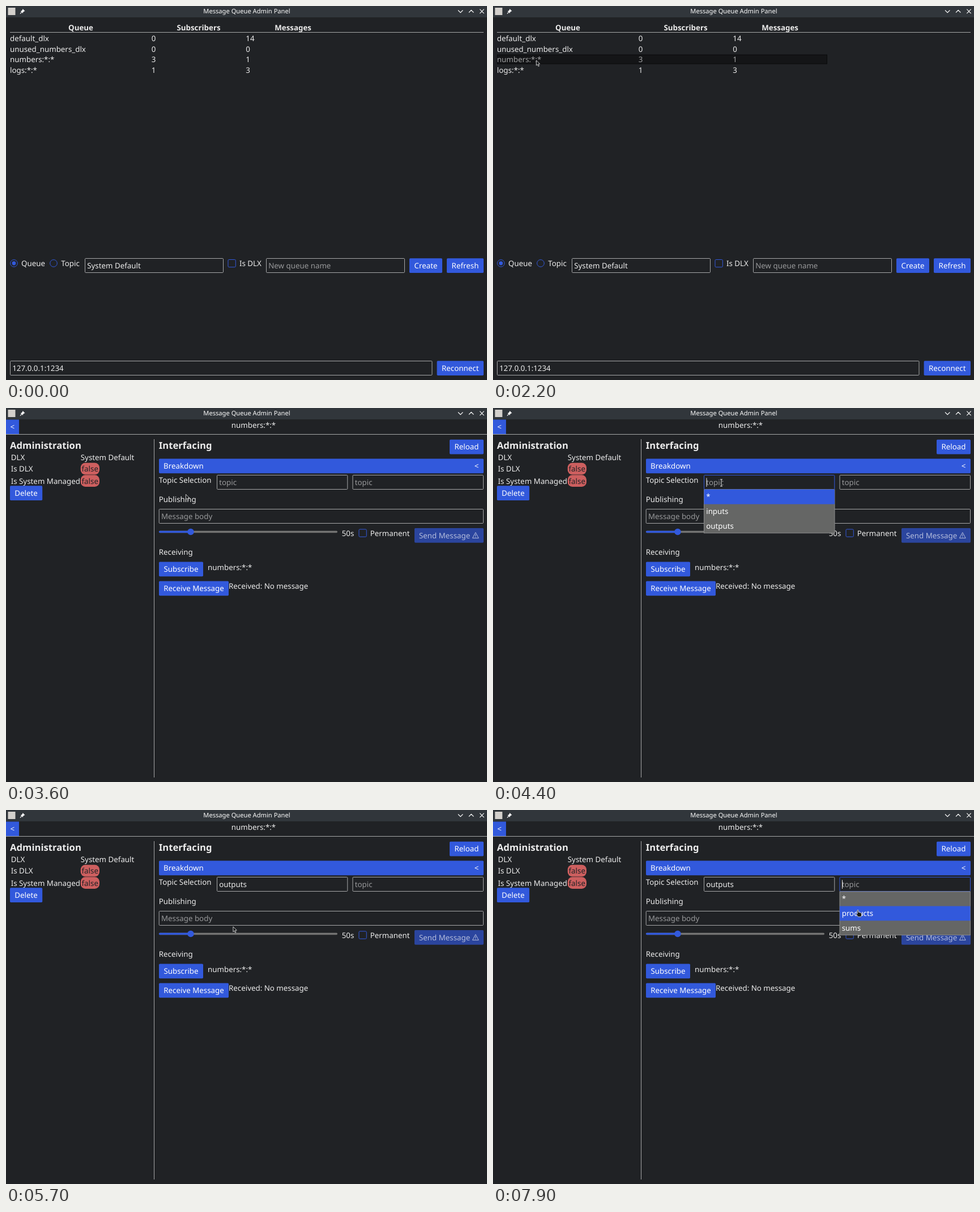
These frames come from a looping animation (849x660 px, 8 s). An HTML page:

```html
<!DOCTYPE html>
<html lang="en">
<head>
<meta charset="utf-8">
<title>Message Queue Admin Panel</title>
<style>
  html, body { margin: 0; width: 100%; height: 100%; overflow: hidden; background: #202225; }
  svg { display: block; width: 100vw; height: 100vh; }
  text {
    font: 13.333px "Noto Sans", "Open Sans", sans-serif;
    fill: #ececec; white-space: pre; text-rendering: geometricPrecision;
  }
  .bold { font-weight: 700; }
  .head { font-size: 16.667px; font-weight: 700; }
  .title { font-size: 11.15px; fill: #fcfcfc; }
  .mid { text-anchor: middle; }
  .hint { fill: #97989a; }
  .dark { fill: #202225; }
  .btn { fill: #3259dc; }
  .on-btn { fill: #fff; }
  .off { fill: #2b459e; }
  .on-off { fill: #b3bcdc; }
  .line { stroke: #a6a7a8; fill: none; }
  .box { fill: none; stroke: #a6a7a8; }
  .box.hover { stroke: #e6e6e6; }
  .box.focus { stroke: #3259dc; }
  .tick { fill: none; stroke: #3259dc; }
  .pill { fill: #cd5f5f; }
  .row rect { fill: none; }
  .row.hover rect { fill: #141517; stroke: #08090a; }
  .row.hover text { fill: #a0a1a2; }
  .icon { fill: none; stroke: #fcfcfc; stroke-width: 1.1; }
  .shape { fill: #17191b; stroke: #eee; stroke-width: .8; stroke-linejoin: round; }
</style>
</head>
<body>
<svg viewBox="0 0 849 660" preserveAspectRatio="none">
  <rect width="849" height="660" fill="#202225"/>
  <g id="list"></g>
  <g id="admin"></g>
  <g id="menu"></g>
  <g id="bar">
    <rect width="849" height="20" fill="#31363b"/>
    <rect x="3.5" y="3" width="13" height="13" fill="#d3d0cc"/>
    <path d="M29.5 5 33.5 9 31.8 9.4 29.9 11.3 29.6 13 25.6 9 27.3 8.7 29.1 6.8Z" fill="#fcfcfc"/>
    <path d="M27.6 11 25 13.6" class="icon"/>
    <path d="M798 7.5l4.2 4.2 4.2-4.2M817 11.5l4.2-4.2 4.2 4.2M836.3 5.7l7.4 7.4M843.7 5.7l-7.4 7.4" class="icon"/>
    <text x="425" y="13.4" class="title mid">Message Queue Admin Panel</text>
  </g>
  <g id="cursor">
    <path id="arrow" class="shape" d="M.4.4V9.4L2.5 7.5 4 11 5.5 10.3 4 6.9 6.8 6.7Z"/>
    <g id="beam" fill="none">
      <path d="M-2-6H2M0-6V6M-2 6H2" stroke="#17191b" stroke-width="2.4"/>
      <path d="M-2-6H2M0-6V6M-2 6H2" stroke="#eee" stroke-width="1"/>
    </g>
    <path id="hand" class="shape" d="M-1 1Q0-.6 1 1V4.5Q3 3.8 3.4 5 5 4.6 5.2 5.8 6.6 5.6 6.6 7V9Q6.4 11 5.4 12.4H.4Q-1.4 10-3 8-3.4 6.4-1 7.4Z"/>
  </g>
</svg>
<script>
const $ = id => document.getElementById(id);
const text = (x, y, str, cls = '') => `<text x="${x}" y="${y}" class="${cls}">${str}</text>`;
const rect = (x, y, w, h, cls, r = 0, id = '') =>
  `<rect x="${x}" y="${y}" width="${w}" height="${h}" rx="${r}" class="${cls}" id="${id}"/>`;
const line = d => `<path d="${d}" class="line"/>`;
const button = (x, y, w, label) =>
  rect(x, y, w, 25.7, 'btn', 1.7) + text(x + w / 2, y + 17.7, label, 'mid on-btn');
const field = (id, x, y, w, label, cls = 'hint') =>
  rect(x + .5, y + .5, w - 1, 25, 'box', 1.2, id) +
  `<text x="${x + 4.2}" y="${y + 17.7}" class="${cls}" id="${id}Text">${label}</text>`;
const radio = (x, y, on) => `<circle cx="${x}" cy="${y}" r="6.3" class="tick"/>` +
  (on ? `<circle cx="${x}" cy="${y}" r="3.4" class="btn"/>` : '');

const rows = [
  ['default_dlx', 0, 14],
  ['unused_numbers_dlx', 0, 0],
  ['numbers:*:*', 3, 1],
  ['logs:*:*', 1, 3]
];
const rowTop = i => 48.3 + 18.85 * i;

$('list').innerHTML =
  text(132, 42.8, 'Queue', 'bold mid') + text(340, 42.8, 'Subscribers', 'bold mid') +
  text(506.6, 42.8, 'Messages', 'bold mid') + line('M7 46.5H843') +
  rows.map(([name, subs, count], i) => {
    const y = rowTop(i), base = y + 13.4;
    return `<g class="row">${rect(7.5, y + .2, 582, 15.8, '')}` +
      text(7, base, name) + text(256.8, base, subs) + text(423.3, base, count) + '</g>';
  }).join('') +
  radio(14, 454, true) + text(27, 459, 'Queue') +
  radio(84, 454, false) + text(97.3, 459, 'Topic') +
  field('dlx', 139, 445, 245, 'System Default', '') +
  rect(392, 447.5, 13.3, 13.3, 'tick', 1.7) + text(412, 459, 'Is DLX') +
  field('name', 459, 445, 245, 'New queue name') +
  button(712, 445.3, 58, 'Create') + button(778, 445.3, 65, 'Refresh') +
  field('host', 7, 626, 745.5, '127.0.0.1:1234', '') + button(760.6, 626.2, 82.4, 'Reconnect');

$('admin').innerHTML =
  rect(0, 20.5, 23, 25.7, 'btn') + text(11.2, 38.2, '&lt;', 'mid on-btn') +
  text(437, 34.6, 'numbers:*:*', 'mid') + line('M0 46.5H849M261.5 55V652') +
  text(7, 72, 'Administration', 'head') +
  text(8.7, 92.2, 'DLX') + text(131.8, 92.2, 'System Default') +
  text(8.7, 112.2, 'Is DLX') + text(8.7, 133.7, 'Is System Managed') +
  rect(131.7, 96.8, 33.3, 20.8, 'pill', 8.3) + text(133.5, 112.2, 'false', 'dark') +
  rect(131.7, 118.2, 33.3, 20.8, 'pill', 8.3) + text(133.5, 133.7, 'false', 'dark') +
  button(7, 137.3, 57.2, 'Delete') +
  text(269.8, 72, 'Interfacing', 'head') + button(783, 55.7, 60, 'Reload') +
  rect(270, 89.5, 573, 25.7, 'btn', 1.7) + text(278, 107.2, 'Breakdown', 'on-btn') +
  text(830.6, 107.2, '&lt;', 'mid on-btn') +
  text(269.8, 132.3, 'Topic Selection') +
  field('first', 372, 118, 231.3, 'topic') + field('second', 611.5, 118, 231.5, 'topic') +
  text(269.8, 166, 'Publishing') + field('body', 269.7, 178, 573.3, 'Message body') +
  '<rect x="270" y="216.8" width="315" height="3.4" rx="1.6" fill="#747473"/>' +
  rect(270, 216.8, 56, 3.4, 'btn', 1.6) + '<circle cx="326" cy="218.5" r="5.8" class="btn"/>' +
  text(592.7, 225.5, '50s') + rect(623, 214, 13.3, 13.3, 'tick', 1.7) + text(642.7, 225.5, 'Permanent') +
  rect(721, 212, 122, 25.7, 'off', 1.7) + text(729, 229.7, 'Send Message', 'on-off') +
  '<path d="M828.8 219.6 834.2 229.6H823.4ZM828.8 222.8V226.4M828.8 227.3V228.4" fill="none" stroke="#b3bcdc"/>' +
  text(269.8, 259.2, 'Receiving') + button(270, 271.6, 78, 'Subscribe') + text(356, 285.6, 'numbers:*:*') +
  button(270, 305.5, 123, 'Receive Message') + text(393, 319.3, 'Received: No message') +
  '<path id="caret" d="M0 123.5V139" stroke="#ececec"/>';

$('menu').innerHTML =
  '<rect x=".5" y="144" width="230.5" height="76.7" fill="#656665" stroke="#8b8c8c"/>' +
  rect(.5, 0, 230.5, 25.7, 'btn', 0, 'pick') +
  [0, 1, 2].map(i => text(4.2, 161.2 + 25.9 * i, '', 'on-btn')).join('');

// Pointer path: time, x, y
const path = [
  [800, 330, -14], [1200, 180, 110], [1400, 118, 172], [1700, 84, 131], [2200, 76, 95.5],
  [3100, 76, 95.5], [3300, 152, 113], [3600, 317, 152], [3800, 383, 142], [4000, 403, 132],
  [4900, 403, 132], [5100, 403, 184], [5500, 400.5, 205.5],
  [6000, 400.5, 205.5], [6200, 520, 172], [6400, 651, 137.5],
  [7500, 651, 137.5], [7900, 644, 176]
];

function pointer(t) {
  const i = path.findIndex(p => p[0] > t);
  if (i < 0) return path.at(-1).slice(1);
  if (i === 0) return path[0].slice(1);
  const [t0, x0, y0] = path[i - 1], [t1, x1, y1] = path[i];
  const k = (t - t0) / (t1 - t0);
  return [x0 + (x1 - x0) * k, y0 + (y1 - y0) * k];
}

const fields = { first: [372, 118, 231, 26], second: [611.5, 118, 231.5, 26], body: [270, 178, 573, 26] };
const inside = (x, y, [l, t, w, h]) => x >= l && x < l + w && y >= t && y < t + h;
const show = (id, on) => { $(id).style.display = on ? '' : 'none'; };
const rowEls = [...document.querySelectorAll('.row')];
const optionEls = [...$('menu').querySelectorAll('text')];

function draw(t) {
  const [x, y] = pointer(t);
  const onList = t < 2600;
  const open = t >= 4400 && t < 5700 ? 'first' : t >= 6700 ? 'second' : '';
  show('list', onList);
  show('admin', !onList);
  show('menu', open);
  rowEls.forEach((el, i) =>
    el.classList.toggle('hover', t >= 900 && inside(x, y, [7, rowTop(i), 583, 16.7])));

  const left = open ? fields[open][0] : 0;
  const overMenu = open && inside(x, y, [left, 144, 231, 77]);
  let overField = false;
  for (const id in fields) {
    const over = !onList && !overMenu && inside(x, y, fields[id]);
    overField ||= over;
    $(id).setAttribute('class', 'box' + (id === open ? ' focus' : over ? ' hover' : ''));
  }
  const chosen = t >= 5700;
  $('firstText').textContent = chosen ? 'outputs' : 'topic';
  $('firstText').setAttribute('class', chosen ? '' : 'hint');

  if (open) {
    const options = open === 'first' ? ['*', 'inputs', 'outputs'] : ['*', 'products', 'sums'];
    const index = overMenu ? Math.min(2, Math.floor((y - 144) / 25.7)) : 0;
    optionEls.forEach((el, i) => { el.textContent = options[i]; });
    $('pick').setAttribute('y', 144 + 25.6 * index);
    $('menu').setAttribute('transform', `translate(${left})`);
    $('caret').setAttribute('transform', `translate(${left + 5})`);
  }
  // The caret is only repainted while the pointer moves
  const caretOff = (t >= 5000 && t < 5400) || (t >= 7600 && t < 7700);
  show('caret', open && !caretOff);

  show('cursor', t >= 900);
  $('cursor').setAttribute('transform', `translate(${x} ${y})`);
  show('hand', overMenu);
  show('beam', overField);
  show('arrow', !overMenu && !overField);
}

const start = performance.now();
function tick(now) {
  const t = Math.max(0, now - start) % 8000;
  draw(Math.floor(t / 100) * 100);
  requestAnimationFrame(tick);
}
draw(0);
requestAnimationFrame(tick);
</script>
</body>
</html>
```
